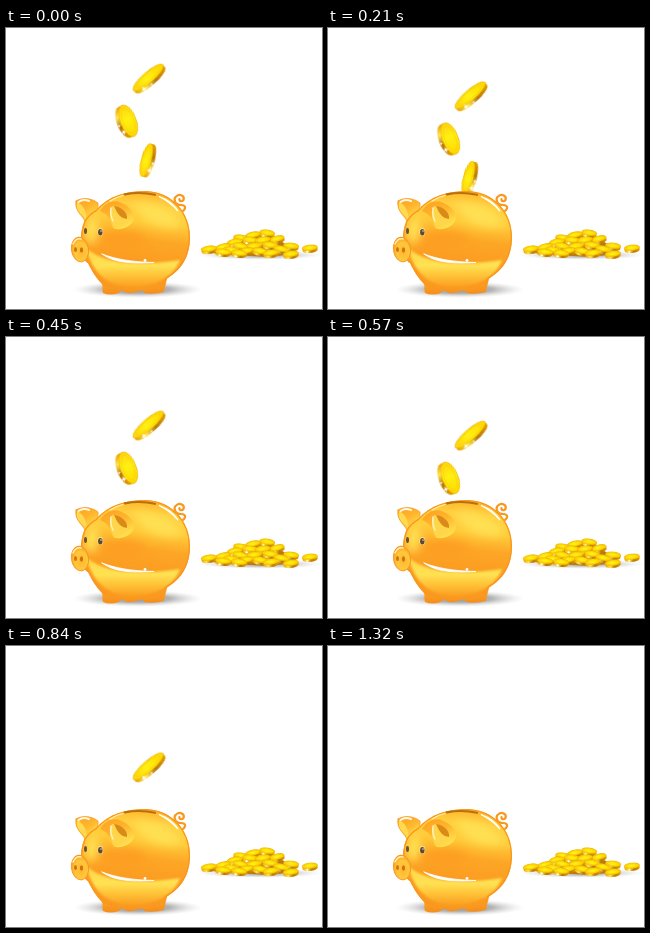
Write an HTML page that moves like this. It is 316 by 281 pixels and loops after 1.8 s.

```html
<!DOCTYPE html>
<html lang="en">
<head>
<meta charset="utf-8">
<title>Piggy bank</title>
<style>
html, body { margin: 0; width: 100%; height: 100%; overflow: hidden; background: #fff; }
svg { display: block; width: 316px; height: 281px; }
</style>
</head>
<body>
<svg viewBox="0 0 316 281">
  <defs>
    <linearGradient id="skin" x1=".55" y1="0" x2=".42" y2="1">
      <stop offset="0" stop-color="#ffb52b"/>
      <stop offset=".14" stop-color="#ffd040"/>
      <stop offset=".3" stop-color="#ffcb3a"/>
      <stop offset=".48" stop-color="#fda626"/>
      <stop offset=".75" stop-color="#fb9a20"/>
      <stop offset="1" stop-color="#fa9820"/>
    </linearGradient>
    <linearGradient id="belly" x1="0" y1="0" x2="0" y2="1">
      <stop offset="0" stop-color="#ffd548"/>
      <stop offset=".45" stop-color="#ffe253"/>
      <stop offset=".7" stop-color="#ffc338"/>
      <stop offset="1" stop-color="#fb9f22"/>
    </linearGradient>
    <linearGradient id="ear" x1="0" y1="0" x2=".6" y2="1">
      <stop offset="0" stop-color="#ff9f20"/>
      <stop offset=".5" stop-color="#ffb42c"/>
      <stop offset="1" stop-color="#ffe04e"/>
    </linearGradient>
    <linearGradient id="foot" x1="0" y1="0" x2="0" y2="1">
      <stop offset="0" stop-color="#ffb02b"/>
      <stop offset="1" stop-color="#f58d1b"/>
    </linearGradient>
    <radialGradient id="nose" cx=".55" cy=".6" r=".6">
      <stop offset="0" stop-color="#ffb62f"/>
      <stop offset=".6" stop-color="#ffc83c"/>
      <stop offset="1" stop-color="#fb9a1f"/>
    </radialGradient>
    <linearGradient id="face" x1="0" y1="0" x2="1" y2="0">
      <stop offset="0" stop-color="#ffd410"/>
      <stop offset=".45" stop-color="#fff012"/>
      <stop offset="1" stop-color="#ffd800"/>
    </linearGradient>
    <linearGradient id="rim" x1="0" y1="0" x2="1" y2="0">
      <stop offset="0" stop-color="#e8a400"/>
      <stop offset=".3" stop-color="#ffe457"/>
      <stop offset=".6" stop-color="#b87808"/>
      <stop offset="1" stop-color="#e2a000"/>
    </linearGradient>
    <radialGradient id="shade">
      <stop offset="0" stop-color="#8c8c8c"/>
      <stop offset=".5" stop-color="#a8a8a8" stop-opacity=".85"/>
      <stop offset="1" stop-color="#ddd" stop-opacity="0"/>
    </radialGradient>
    <filter id="soft" x="-50%" y="-50%" width="200%" height="200%"><feGaussianBlur stdDeviation="4"/></filter>
    <filter id="smooth"><feGaussianBlur stdDeviation="1"/></filter>
    <path id="body" d="M90 182C102 168 120 163 140 163C166 164 184 184 184 209C184 230 174 243 160 251L158 260C140 264 112 264 97 257C90 250 86 243 82 235C75 232 72 210 78 194C81 188 86 184 90 182Z"/>
    <clipPath id="inBody"><use href="#body"/></clipPath>
    <clipPath id="aboveSlot"><rect width="316" height="165"/></clipPath>
  </defs>

  <ellipse cx="132" cy="261.500" rx="65" ry="8.500" fill="url(#shade)"/>
  <ellipse cx="254" cy="227" rx="63" ry="5" fill="url(#shade)" opacity=".7"/>
  <path d="M205 225L236 210L262 206L278 215L290 226L262 229L225 227Z" fill="#b97a10"/>
  <g id="pile"></g>
  <g id="falling" clip-path="url(#aboveSlot)"></g>

  <g id="pig" stroke-linecap="round">
    <g fill="url(#foot)">
      <path d="M95 248C97 256 96 261 97 265Q104 268 113 265L116 262Q120 267 131 264L132 254Z"/>
      <path d="M133 255Q137 260 138 265Q148 267 158 264Q159 258 162 248Z"/>
    </g>
    <path d="M175 184C180 182 181 177 175 177C169 177 167 171 170 168.500C174 165 179 168 177.500 172C176 174 173 173.500 173.500 171" fill="none" stroke="#f9981f" stroke-width="2.200"/>
    <path d="M70 173C76 169 86 170 92 175C93 181 88 188 79 194C78 188 68 184 70 173Z" fill="url(#ear)" stroke="#f7961e" stroke-width=".7"/>
    <path d="M71 174C76 176 81 182 80 191C77 187 69 184 71 174Z" fill="#ffd950"/>
    <path d="M72.500 174Q77 170.500 83 173" fill="none" stroke="#fff8df" stroke-width="2"/>
    <use href="#body" fill="url(#skin)"/>
    <g clip-path="url(#inBody)">
      <g filter="url(#soft)">
        <path d="M126 175Q160 172 178 196Q160 204 138 191Z" fill="#ffe052"/>
        <path d="M88 187L80 197L79 212L88 216L93 198Z" fill="#ffe455"/>
        <ellipse cx="118" cy="212" rx="22" ry="9" fill="#fd9f22"/>
      </g>
      <path d="M80 220C97 235 128 239 174 232C168 248 152 258 128 259C103 259 88 248 80 220Z" fill="url(#belly)" filter="url(#smooth)"/>
      <use href="#body" fill="none" stroke="#f8981f" stroke-width="2.600"/>
    </g>
    <path d="M119 166.300Q134 163.500 149 166.800" fill="none" stroke="#b8700f" stroke-width="2.200"/>
    <path d="M104 173Q110 169 117 167.500" fill="none" stroke="#ffeeb8" stroke-width="1.200"/>
    <path d="M153 168.500Q166 173 172 183Q164 174 153 168.500Z" fill="#fff" stroke="#fff" stroke-width="1.200"/>
    <path d="M96 226C107 234 122 236 148 234.500C125 234 109 231 96 226Z" fill="#fff" stroke="#fff" stroke-width=".8"/>
    <circle cx="139" cy="232.500" r="1.400" fill="#fff"/>

    <path d="M94 183C98 176 105 172 112 173.500C121 176 128 183 128 190C127 197 119 202 109 201C104 199 107 188 94 183Z" fill="url(#ear)"/>
    <path d="M106 178C115 178 123 186 122 193C117 198 113 199 109 199C103 194 103 185 106 178Z" fill="#ffd64a"/>
    <path d="M108 178C116 179 122 185 121 191Q113 191 108 178Z" fill="#d98a18"/>
    <path d="M105 180Q104 187 107 193" fill="none" stroke="#fff2bd" stroke-width="1.500"/>

    <ellipse cx="74" cy="221.500" rx="8.600" ry="12.500" fill="url(#nose)" stroke="#f6941e" stroke-width=".8" transform="rotate(-8 74 221.500)"/>
    <path d="M67 216Q70 209.500 75 211" fill="none" stroke="#fff0b0" stroke-width="1.500"/>
    <ellipse cx="69.500" cy="221.500" rx="1.500" ry="2.600" fill="#d0720f"/>
    <ellipse cx="75.500" cy="222" rx="1.600" ry="2.800" fill="#d0720f"/>
    <ellipse cx="94.300" cy="204" rx="2.900" ry="4" fill="#ffdf90"/>
    <ellipse cx="94.300" cy="204.200" rx="2.200" ry="3.300" fill="#5e4a30"/>
    <ellipse cx="79.500" cy="203" rx="1.500" ry="3" fill="#6b5330"/>
    <circle cx="95" cy="203" r=".7" fill="#fff"/>
  </g>
</svg>
<script>
const LOOP = 1800, STEP = 30, SPEED = 91 / 1080, FADE = 240;
const NS = "http://www.w3.org/2000/svg";

function add(parent, tag, attrs) {
  const el = document.createElementNS(NS, tag);
  for (const key in attrs) el.setAttribute(key, attrs[key]);
  return parent.appendChild(el);
}

// A disc with its edge showing on the +y side of its own axes.
function coin(parent, { x, y, rx, ry, turn, depth }) {
  const g = add(parent, "g", { transform: `translate(${x} ${y}) rotate(${turn})` });
  const h = depth / 2;
  add(g, "path", {
    d: `M${-rx} ${-h}A${rx} ${ry} 0 0 1 ${rx} ${-h}V${h}A${rx} ${ry} 0 0 1 ${-rx} ${h}Z`,
    fill: "url(#rim)"
  });
  add(g, "ellipse", { cy: -h, rx, ry, fill: "url(#face)", stroke: "#f2b400", "stroke-width": 0.6 });
  add(g, "ellipse", {
    cy: -h, rx: rx * 0.8, ry: ry * 0.7, fill: "none", stroke: "#f5c200", "stroke-width": 0.5
  });
  return g;
}

function sparkle(g, x, y, r) {
  const q = r * 0.25;
  add(g, "path", {
    d: `M${x} ${y - r}l${q} ${r - q}l${r - q} ${q}l${q - r} ${q}l${-q} ${r - q}l${-q} ${q - r}l${q - r} ${-q}l${r - q} ${-q}Z`,
    fill: "#fff"
  });
}

const pile = document.getElementById("pile");
[
  [261, 206, 8], [247, 208, -12], [235, 211, 10], [271, 212, -14], [244, 213, 6],
  [257, 213, -8], [229, 215, -10], [264, 218, 8], [285, 219, 6], [217, 220, -14],
  [248, 219, -8], [234, 219, 12], [304, 221, -6], [203, 222, -8], [275, 222, 12],
  [225, 223, 8], [240, 224, -12], [254, 224, 9], [217, 225, 5], [265, 226, -8],
  [233, 226, 6], [285, 227, -7]
].forEach(([x, y, turn], i) => {
  const g = coin(pile, { x, y, turn, rx: 7.6, ry: 2.7, depth: 2.6 });
  if (i % 2 == 0) sparkle(g, -3, 2.6, 1.8);
});

const falling = document.getElementById("falling");
[
  { x: 143.3, y: 50.8, rx: 19.5, ry: 5.3, turn: -41, depth: 3.6, fadeAt: 1080 },
  { x: 120.5, y: 93.5, rx: 16.5, ry: 7.8, turn: 69, depth: 3.8, fadeAt: 570 },
  { x: 142, y: 132.5, rx: 17, ry: 4.9, turn: -75, depth: 3.6, fadeAt: 210 }
].forEach(c => {
  const mover = add(falling, "g", {});
  const g = coin(mover, c);
  const side = Math.sign(c.turn);
  sparkle(g, side * c.rx * 0.55, c.ry * 0.8, 3);
  sparkle(g, side * c.rx * 0.1, c.ry + 0.6, 1.8);

  const end = c.fadeAt + FADE;
  const timing = { duration: LOOP, iterations: Infinity };
  const fall = `translate(0px, ${SPEED * end}px)`;
  mover.animate([
    { offset: 0, transform: "translate(0px, 0px)", easing: `steps(${end / STEP})` },
    { offset: end / LOOP, transform: fall },
    { offset: 1, transform: fall }
  ], timing);
  mover.animate([
    { offset: 0, opacity: 1 },
    { offset: c.fadeAt / LOOP, opacity: 1, easing: `steps(${FADE / STEP})` },
    { offset: end / LOOP, opacity: 0 },
    { offset: 1, opacity: 0 }
  ], timing);
});
</script>
</body>
</html>
```
